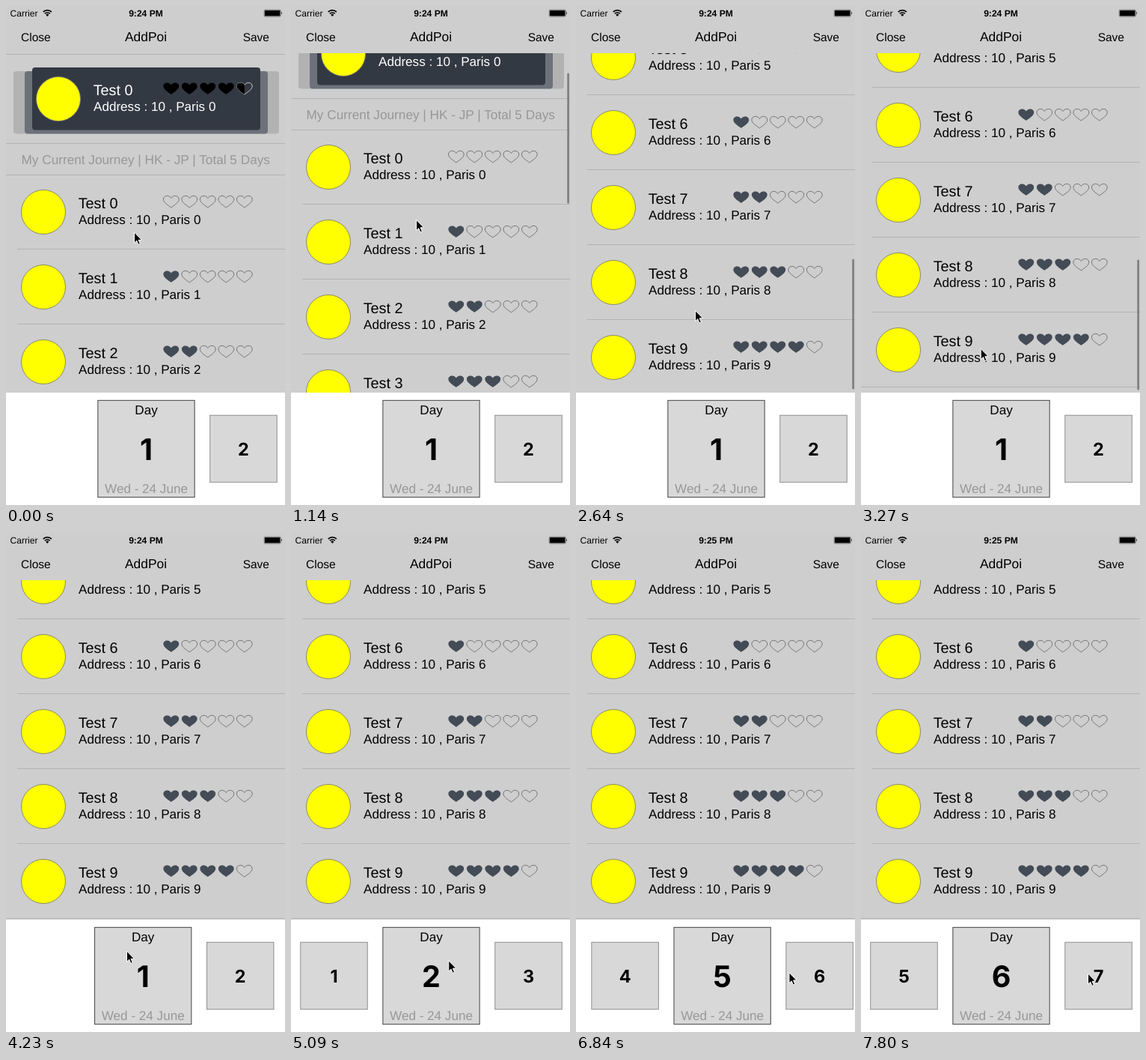
Write an HTML page that moves like this. It is 373 by 666 pixels and loops after 8 s.

```html
<!DOCTYPE html>
<html lang="en">
<head>
<meta charset="utf-8">
<title>Journey planner</title>
<style>
html, body { margin: 0; width: 100%; height: 100%; overflow: hidden; background: #cecece; }
svg { display: block; width: 373px; height: 666px; }
text { font-family: "Liberation Sans", Arial, sans-serif; font-size: 17.1px; text-rendering: geometricPrecision; }
.mid { text-anchor: middle; }
.end { text-anchor: end; }
.bold { font-weight: bold; }
.status { font-size: 12.1px; }
.button { font-size: 15.5px; }
.title { font-size: 17.4px; }
.name { font-size: 19.8px; }
.number { font-family: Inter, Roboto, sans-serif; font-weight: bold; }
.muted { fill: #979797; }
.journey { font-size: 17.22px; }
.line { stroke: #b3b3b3; }
</style>
</head>
<body>
<svg viewBox="0 0 373 666" xmlns="http://www.w3.org/2000/svg">
  <defs>
    <path id="heart" d="M10.8 16C7 13 .4 9.5 .4 5 .4 2 2.8 .4 5.4 .4 8 .4 10 2 10.8 3.6 11.6 2 13.6 .4 16.2 .4 18.8 .4 21.2 2 21.2 5 21.2 9.5 14.6 13 10.8 16Z"/>
    <clipPath id="half"><rect width="10.8" height="17"/></clipPath>
    <clipPath id="view"><rect y="63" width="373" height="453"/></clipPath>
  </defs>
  <rect width="373" height="666" fill="#cecece"/>
  <g clip-path="url(#view)">
    <g id="list"></g>
    <rect id="bar" x="369.3" width="2.6" height="174" rx="1.3" fill="#7d7d7d"/>
  </g>

  <text class="status" x="5.5" y="14">Carrier</text>
  <g fill="none" stroke="#000" stroke-width="1.7">
    <path d="M49.7 7.9A8 8 0 0 1 60.9 7.9M51.8 10.2A5 5 0 0 1 58.8 10.2"/>
    <path d="M53.2 11.6A3 3 0 0 1 57.4 11.6L55.3 13.9Z" fill="#000" stroke="none"/>
  </g>
  <text id="clock" class="status bold mid" x="187" y="13.6"></text>
  <rect x="345.2" y="5.2" width="22" height="8.8" rx="1.5" fill="none" stroke="#000" stroke-width=".5"/>
  <rect x="346" y="6" width="20.4" height="7.2" rx=".8"/>
  <path d="M368.2 7.8Q370 9.5 368.2 11.2Z"/>
  <text class="button" x="20" y="47">Close</text>
  <text class="title mid" x="187" y="47">AddPoi</text>
  <text class="button end" x="352" y="47">Save</text>

  <rect y="516" width="373" height="150" fill="#fff"/>
  <g id="days"></g>
  <path id="cursor" d="M0 0V14.2L3.2 11.2 5.4 16.4 7.8 15.4 5.6 10.3H10Z" stroke="#fff"/>
</svg>
<script>
const LOOP = 8000, STEP = 87.8, PITCH = 130, ROWS = 10, DAYS = 8;
const $ = id => document.getElementById(id);
const times = (n, fn) => Array.from({ length: n }, (_, i) => fn(i)).join('');

// Eased progress from 0 to 1 between two steps
function ease(step, from, to) {
  const p = Math.min(1, Math.max(0, (step - from) / (to - from)));
  return p * p * (3 - 2 * p);
}

// Flick that decelerates and bounces lightly past its end
const flick = t => t > 0 ? 1 - Math.exp(-0.3 * t) * Math.cos(0.186 * t) : 0;

const scrollAt = s => Math.round(175 * ease(s, 7.2, 22) + 535 * flick(s - 22));
const offsetAt = s => PITCH * (ease(s, 46.9, 57) + 3 * ease(s, 62, 79.5) + ease(s, 82, 89));
const barAt = s => ease(s, 7, 8) - ease(s, 38, 42);

// Where the pointer turns: step, x, y
const TURNS = [[0, 171.5, 302], [5, 174, 364], [13, 167.5, 285.5], [22, 155.5, 236.5], [30, 159.5, 406.5],
  [48, 161.5, 558], [53, 100, 566], [61, 262, 573], [70, 125.5, 575], [80, 303.5, 588]];

function cursorAt(step) {
  const position = [0, 0];
  TURNS.forEach(([to, ...point], i) => {
    const p = i ? ease(step, TURNS[i - 1][0], to) : 1;
    point.forEach((v, axis) => position[axis] += (v - position[axis]) * p);
  });
  return position;
}

const line = (x, y) => `<path class="line" d="M${x} ${y}H373"/>`;

function heart(i, rating, fill, outline) {
  const part = rating - i;
  const empty = `<use href="#heart" fill="none" stroke="${outline}" stroke-width=".9"/>`;
  const full = `<use href="#heart" fill="${fill}"/>`;
  const half = `<g clip-path="url(#half)">${full}</g>`;
  return `<g transform="translate(${210 + i * 24.5} -22)">${part >= 1 ? full : part > 0 ? empty + half : empty}</g>`;
}

function poi(n, x, y, rating, ink, fill, outline) {
  return `<g transform="translate(0 ${y})">
    <circle cx="${x}" r="29.5" fill="#ff0" stroke="#80806c" stroke-width=".9"/>
    <text class="name" x="${x + 46.7}" y="-5" fill="${ink}">Test ${n}</text>
    <text x="${x + 47}" y="16" fill="${ink}">Address : 10 , Paris ${n}</text>
    ${times(5, i => heart(i, rating, fill, outline))}</g>`;
}

const plate = (x, y, fill) =>
  `<rect x="${x}" y="${y}" width="${375 - 2 * x}" height="83.5" rx="4" fill="${fill}"/>`;

$('list').innerHTML = line(0, 64.5)
  + plate(10, 87, '#b2b2b2') + plate(25, 87, '#6c717a') + plate(35, 82, '#333943')
  + poi(0, 70, 124, 4.5, '#fff', '#000', '#d5d5d5')
  + line(0, 183.5)
  + '<text class="muted journey" x="20.5" y="211">My Current Journey | HK - JP | Total 5 Days</text>'
  + line(0, 225.5)
  + times(ROWS, n => poi(n, 50, 275 + n * 100, n % 5, '#000', '#434b56', '#6c6c6c')
    + line(n < ROWS - 1 ? 15 : 0, 324.5 + n * 100));

const box = (size, stroke) =>
  `<rect x="${-size / 2}" y="${591 - size / 2}" width="${size}" height="${size}" fill="#d8d8d8" stroke="${stroke}"/>`;

$('days').innerHTML = times(DAYS, i => `<g class="mid">
  <g>${box(89.5, '#8e8e8e')}<text class="number" y="600" style="font-size:23.5px">${i + 1}</text></g>
  <g>${box(129.3, '#444')}<text y="545">Day</text>
    <text class="number" y="605.5" style="font-size:39.5px">${i + 1}</text>
    <text class="muted" y="650">Wed - 24 June</text></g></g>`);

const cards = [...$('days').children];

function draw(now) {
  const step = Math.floor((now % LOOP + 20) / STEP);
  const scroll = scrollAt(step), offset = offsetAt(step);
  $('list').setAttribute('transform', `translate(0 ${-scroll})`);
  $('bar').setAttribute('y', Math.min(338.5, 66.5 + scroll * 0.384));
  $('bar').setAttribute('opacity', barAt(step));
  $('cursor').setAttribute('transform', `translate(${cursorAt(step)})`);
  $('clock').textContent = step < 67 ? '9:24 PM' : '9:25 PM';
  const current = Math.round(offset / PITCH);
  cards.forEach((card, i) => {
    card.setAttribute('transform', `translate(${187.5 + i * PITCH - offset} 0)`);
    card.children[0].style.display = i === current ? 'none' : '';
    card.children[1].style.display = i === current ? '' : 'none';
  });
}

const start = performance.now();
function tick() {
  draw(performance.now() - start);
  requestAnimationFrame(tick);
}
tick();
</script>
</body>
</html>
```
